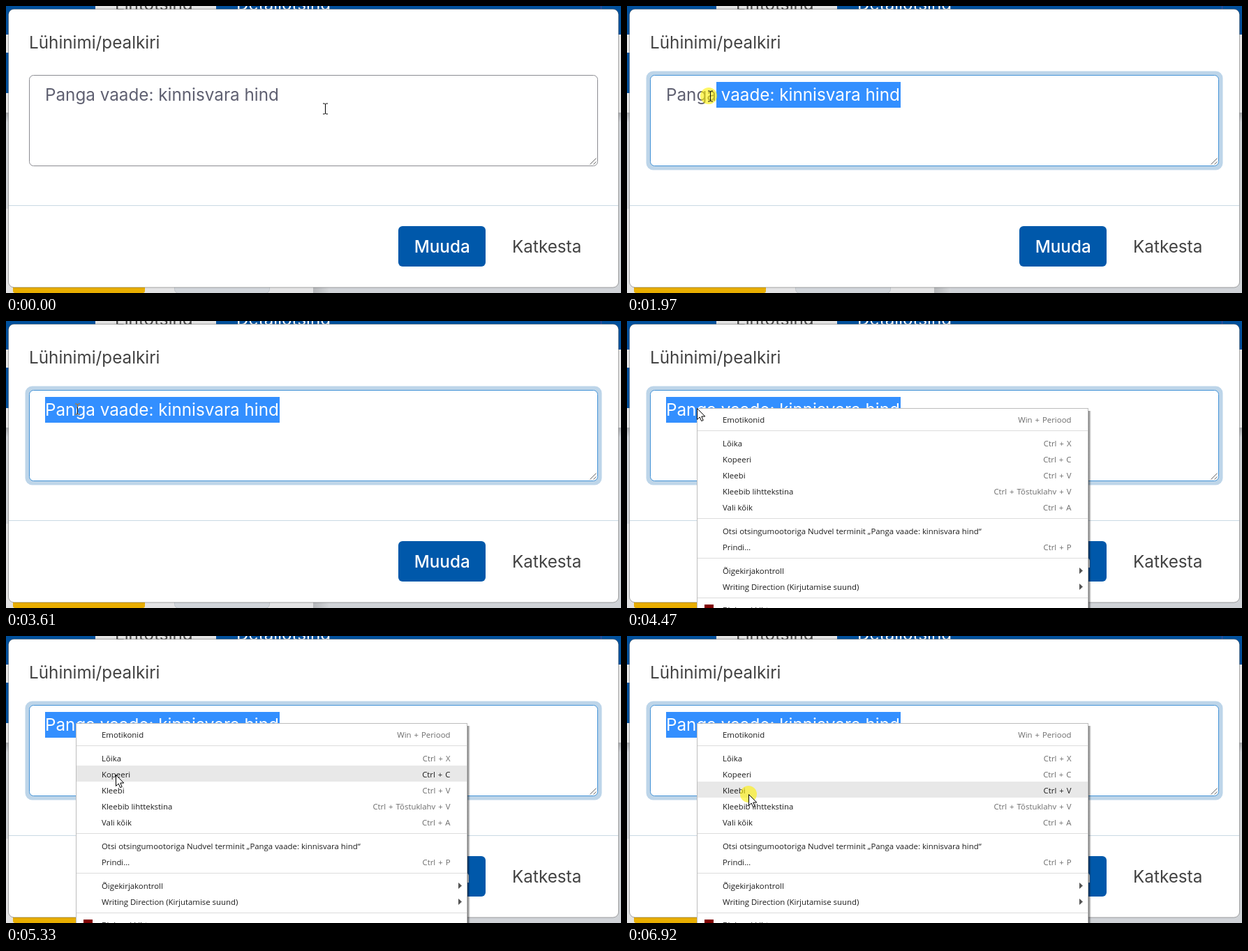
An HTML page for the animation above (8000 ms loop, 881 by 412 pixels).

```html
<!DOCTYPE html>
<html lang="et">
<head>
<meta charset="utf-8">
<title>Pealkirja muutmine</title>
<style>
  html, body { margin: 0; width: 100%; height: 100%; overflow: hidden; background: #d3d5d8; }
  svg { display: block; width: 881px; height: 412px; }
  text { font: 24.25px Inter, "Open Sans", sans-serif; font-optical-sizing: none; }
  #menu text { font: 11.4px "Open Sans", "Noto Sans", sans-serif; fill: #1c1c1c; }
  #menu .keys { fill: #6c6c6c; text-anchor: end; word-spacing: 1px; }
  #menu .hot .keys { fill: #1c1c1c; }
  #menu .row rect { fill: none; }
  #menu .hot rect { fill: #e8e8e8; }
  .mid { text-anchor: middle; }
  #beam { fill: none; stroke: #fff; mix-blend-mode: difference; }
  #beam.pressed { stroke: #111; mix-blend-mode: normal; }
</style>
</head>
<body>
<svg viewBox="0 0 881 412" xmlns="http://www.w3.org/2000/svg">
  <defs>
    <clipPath id="selClip"><rect id="clipBox" x="392" y="109" width="0" height="37"/></clipPath>
    <linearGradient id="shadeDown" x2="0" y2="1">
      <stop offset="0" stop-color="#a9abae"/><stop offset="1" stop-color="#d0d3d7"/>
    </linearGradient>
    <linearGradient id="shadeRight">
      <stop offset="0" stop-color="#b4b6b9"/><stop offset="1" stop-color="#d3d5d8"/>
    </linearGradient>
    <linearGradient id="menuShade">
      <stop offset="0" stop-color="#000" stop-opacity=".55"/><stop offset="1" stop-color="#000" stop-opacity="0"/>
    </linearGradient>
  </defs>

  <!-- dimmed page behind the dialog -->
  <g>
    <rect width="881" height="412" fill="#d0d3d7"/>
    <rect width="881" height="153" fill="#e6e6e6"/>
    <rect width="881" height="41" fill="#00509c"/>
    <rect y="67" width="440" height="58" fill="#00509c"/>
    <rect y="153" width="881" height="14" fill="url(#shadeDown)"/>
    <rect x="128" width="173" height="20" fill="#e2e2e2"/>
    <text x="156" y="6" fill="#444">Lihtotsing</text>
    <text x="330" y="6" fill="#fff">Detailotsing</text>
    <rect x="852" width="1" height="20" fill="#4a4a9a"/>
    <rect y="291" width="440" height="121" fill="#e3e3e4"/>
    <rect x="440" y="300" width="24" height="112" fill="url(#shadeRight)"/>
    <rect x="10" y="370" width="189" height="42" rx="3" fill="#e8ae00"/>
    <rect x="241.5" y="370.5" width="136" height="42" rx="6" fill="#d1d5da" stroke="#bfc4ca"/>
  </g>

  <!-- dialog -->
  <rect x="3.5" y="4.5" width="874" height="399.5" rx="8" fill="#fff" stroke="#000" stroke-opacity=".32"/>
  <text x="33" y="61" fill="#434343">Lühinimi/pealkiri</text>
  <rect x="4" y="286" width="873" height="1" fill="#cad9e4"/>
  <rect x="562" y="316" width="125" height="58" rx="6" fill="#0058aa"/>
  <text class="mid" x="624.7" y="354" fill="#fff" style="font-weight:500">Muuda</text>
  <text class="mid" x="774.7" y="354" fill="#434343">Katkesta</text>

  <!-- text field -->
  <rect id="ring" x="27.5" y="93.5" width="826" height="142" rx="10" fill="#bdd5e9" opacity="0"/>
  <rect id="field" x="33.5" y="99.5" width="814" height="130" rx="6" fill="#fff" stroke="#8b8c92"/>
  <path d="M836.5 227.5l9-9M841.5 227.5l4-4" stroke="#666" fill="none"/>
  <text x="56" y="136" fill="#5f6071">Panga vaade: kinnisvara hind</text>
  <g clip-path="url(#selClip)">
    <rect x="56" y="109" width="336" height="37" fill="#338fff"/>
    <text x="56" y="136" fill="#fff">Panga vaade: kinnisvara hind</text>
  </g>
  <rect id="caret" x="392" y="112" width="1" height="30" fill="#333"/>

  <g id="menu">
    <rect x="661" y="129" width="4" height="283" fill="url(#menuShade)"/>
    <rect x="100.5" y="125.5" width="560" height="300" fill="#fff" stroke="#bdbdbd"/>
    <rect x="111" y="407" width="13" height="13" fill="#800000"/>
  </g>

  <circle id="press" r="12" fill="#fff000" fill-opacity=".6"/>
  <path id="beam" d="M-3.5 -7.5h2.5l1 1l1 -1h2.5M0 -6.5v13M-3.5 7.5h2.5l1 -1l1 1h2.5"/>
  <path id="arrow" d="M.5 .5V16.5L4.2 13L6.7 18.6L9.2 17.5L6.8 12H11.8Z" fill="#fff" stroke="#000"/>
</svg>

<script>
const LOOP = 8000;
const $ = id => document.getElementById(id);
const svgNS = "http://www.w3.org/2000/svg";

function add(parent, tag, attrs, text = "") {
  const el = document.createElementNS(svgNS, tag);
  for (const name in attrs) el.setAttribute(name, attrs[name]);
  el.textContent = text;
  parent.append(el);
  return el;
}

// baseline, label, shortcut
const items = [
  [146, "Emotikonid", "Win + Periood"],
  [180, "Lõika", "Ctrl + X"],
  [203, "Kopeeri", "Ctrl + C"],
  [226, "Kleebi", "Ctrl + V"],
  [249, "Kleebib lihttekstina", "Ctrl + Tõstuklahv + V"],
  [272, "Vali kõik", "Ctrl + A"],
  [306, "Otsi otsingumootoriga Nudvel terminit „Panga vaade: kinnisvara hind“", ""],
  [329, "Prindi…", "Ctrl + P"],
  [363, "Õigekirjakontroll", "▸"],
  [386, "Writing Direction (Kirjutamise suund)", "▸"],
  [419, "Blokeeri kiht", ""]
];

const menu = $("menu");
for (const y of [157, 283, 340, 397])
  add(menu, "rect", { x: 101, y, width: 559, height: 1, fill: "#dcdcdc" });

const rows = items.map(([y, label, keys]) => {
  const g = add(menu, "g", { class: "row" });
  add(g, "rect", { x: 101, y: y - 17, width: 559, height: 23 });
  add(g, "text", { x: 137, y }, label);
  if (keys === "▸") add(g, "path", { d: `M648 ${y - 9}l5 4.5l-5 4.5z`, fill: "#555" });
  else add(g, "text", { class: "keys", x: 636.5, y }, keys);
  return { g, top: y - 17 };
});

// Pointer keys: time, x, y, start of the selection
const keys = [[0, 455, 147, 392]];

function track(from, to, points) {
  const gap = (to - from) / (points.length - 1);
  points.forEach((p, i) => keys.push([Math.floor((from + i * gap) / 10) * 10, ...p]));
}

function glide(n, [x0, y0], [x1, y1], sel) {
  return Array.from({ length: n }, (_, i) => {
    const p = (i + 1) / n, e = p * p * (3 - 2 * p);
    return [x0 + (x1 - x0) * e, y0 + (y1 - y0) * e, sel];
  });
}

const dragX = [400, 400, 396, 368, 310, 234, 168, 117, 84, 60, 47, 43];
const dragSel = [392, 392, 392, 363, 313, 238, 175.7, 128, 85, 56, 56, 56];

track(520, 1220, glide(11, [455, 147], [403, 126], 392));
track(1490, 2250, dragX.map((x, i) => [x, 126 + 3 * Math.min(1, i / 6), dragSel[i]]));
track(3260, 3610, glide(6, [43, 129], [100, 126], 56));
keys.push([4270, 100, 125, 56]);
track(5200, 5450, [[110, 142, 56], [135, 174, 56], [157, 199, 56], [170, 218, 56], [174, 227, 56]]);

const between = (t, a, b) => t >= a && t < b;
const show = (el, on) => { el.style.display = on ? "" : "none"; };
const move = (el, x, y) => el.setAttribute("transform", `translate(${x} ${y})`);

function draw(t) {
  const [, px, py, sel] = keys.findLast(k => k[0] <= t);
  const x = Math.round(px), y = Math.round(py);
  const open = t >= 4470;
  const pressed = between(t, 1490, 2780) || between(t, 4270, 4470) || t >= 6920;

  $("ring").setAttribute("opacity", Math.max(0, Math.min(1, (t - 1490) / 150)));
  $("field").setAttribute("stroke", t < 1490 ? "#8b8c92" : t < 1560 ? "#7b98b6" : "#4292d6");
  $("clipBox").setAttribute("x", sel);
  $("clipBox").setAttribute("width", 392 - sel);
  show($("caret"), t >= 1490 && sel === 392);

  show(menu, open);
  for (const { g, top } of rows)
    g.classList.toggle("hot", t >= 5200 && between(y, top, top + 23));

  show($("press"), pressed);
  move($("press"), x, y);
  show($("beam"), !open);
  $("beam").classList.toggle("pressed", pressed);
  move($("beam"), x + 2.5, y + .5);
  show($("arrow"), open);
  move($("arrow"), x, y);
}

const start = performance.now();
function tick() {
  draw((performance.now() - start) % LOOP);
  requestAnimationFrame(tick);
}
tick();
</script>
</body>
</html>
```
